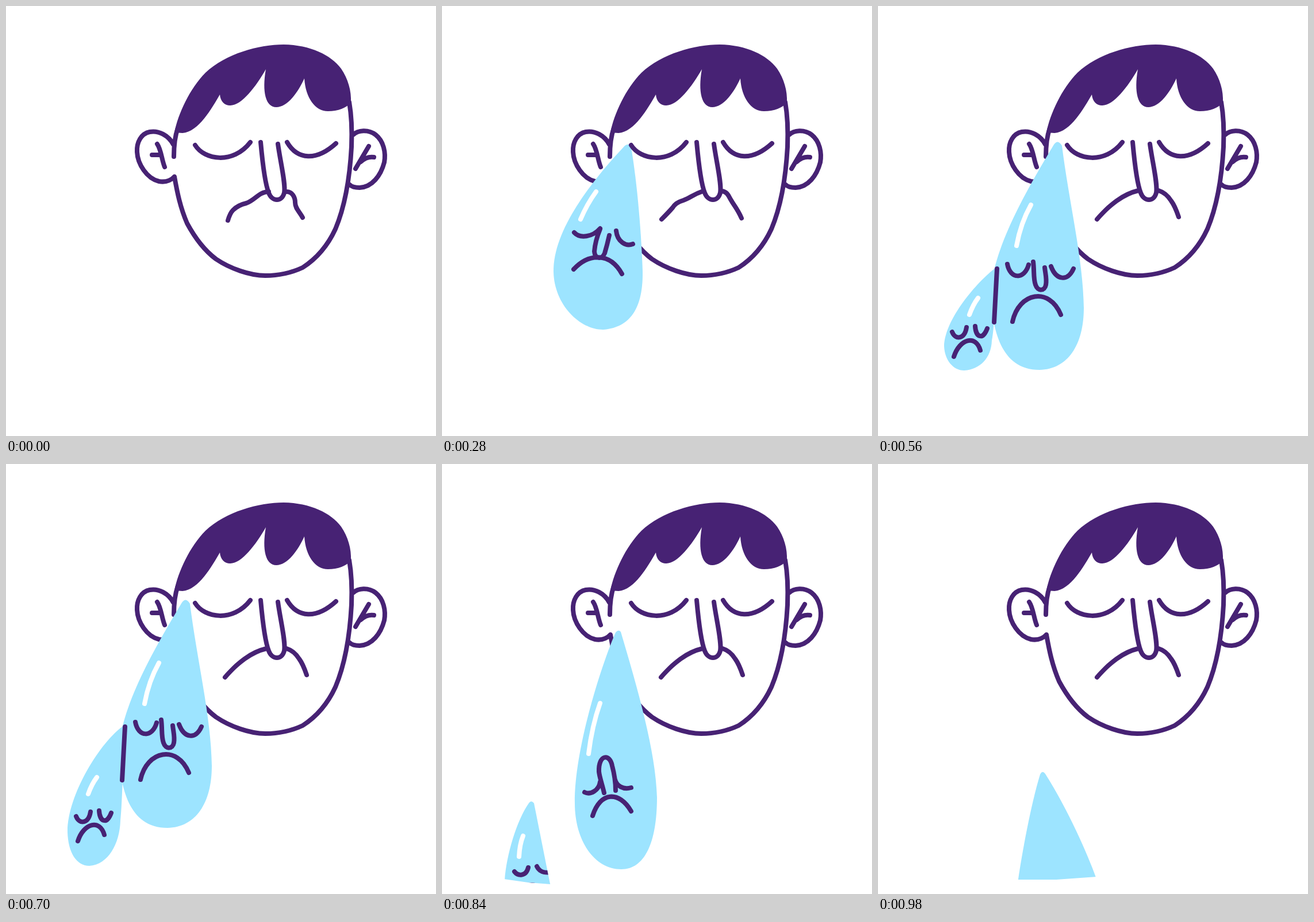
These frames come from a looping animation (748x748 px, 1050 ms). An HTML page with a canvas:

```html
<!DOCTYPE html>
<html>
<head>
<meta charset="utf-8">
<style>
  html, body { margin: 0; height: 100%; overflow: hidden; background: #fff; }
  canvas { display: block; }
</style>
</head>
<body>
<canvas id="stage" width="748" height="748"></canvas>
<script>
const ctx = document.getElementById('stage').getContext('2d');
const INK = '#472274', WATER = '#9de4ff';
const STEP = 70, STEPS = 15;

const hair = new Path2D(`M293 220 C299 188 320 143 347 116 C382 83 440 67 483 67 C530 68 565 85 583 109
  C595 127 601 147 600 168 C592 177 578 183 560 183 C538 183 521 160 519 126 C508 150 490 176 470 176
  C452 176 445 150 452 110 C435 140 410 173 390 173 C380 173 373 166 372 154 C358 178 335 219 307 221 Z`);

const outline = new Path2D(`M299 212 C294 226 292 240 292 262
  M293 297 C298 325 303 350 315 378 C328 402 345 425 365 440 C390 457 425 469 451 469
  C479 469 501 462 516 455 C541 439 560 416 573 388 C589 350 598 300 601 245 C602 220 601 190 597 167
  M291 241 C283 225 265 216 250 219 C235 222 227 237 228 254 C229 275 245 300 266 305 C277 307 286 304 293 297
  M604 224 C612 216 630 214 643 224 C657 235 661 255 658 272 C652 295 637 315 615 316 C607 316 601 314 598 311
  M263 240 C270 250 271 268 276 280 M254 259 L269 259
  M631 244 L608 283 M640 263 Q628 261 617 271`);

const features = new Path2D(`M329 242 C345 268 395 276 425 237 M489 237 C507 268 540 270 574 239
  M443 237 C446 270 451 310 457 325 C463 341 480 341 484 325 C487 310 477 270 473 240`);

// Nothing falls below this floor line
const floor = new Path2D('M0 0 H748 V718 H380 L310 723 L244 723 L189 731 L150 728 L108 722 H0 Z');

const movePairs = (path, fn) => path.replace(/(\d+) (\d+)/g, (_, x, y) => fn(+x, +y));
const shift = (path, dx, dy) => movePairs(path, (x, y) => `${x + dx} ${y + dy}`);
const collapse = (pose, at, point) =>
  ({ at, w: 0, ...Object.fromEntries(['body', 'face', 'shine'].map(k => [k, movePairs(pose[k], () => point)])) });

const mouth = [
  { at: 0, path: 'M457 323 C440 323 433 338 418 343 C405 346 399 351 395 355 C390 360 388 366 386 373 M487 323 C498 322 503 333 503 342 C503 352 510 357 516 368' },
  { at: 2, path: 'M452 320 C440 325 438 337 420 338 C408 339 402 341 401 349 C399 360 396 371 385 372 M488 322 C502 323 500 335 505 345 C510 355 520 355 521 370' },
  { at: 4, path: 'M454 322 C436 328 432 334 420 338 C408 342 405 345 401 351 C394 359 390 363 382 371 M487 322 C497 323 499 332 503 338 C508 347 514 353 521 369' },
  { at: 6, path: 'M453 321 C440 324 426 331 415 339 C407 345 400 351 396 355 C391 360 386 365 381 371 M488 321 C498 324 505 331 510 339 C516 347 520 358 523 367' }
];

const bigTear = [
  { at: 2, w: 7,
    body: 'M319 239 C296 258 268 300 267 331 C267 355 280 374 302 374 C325 373 334 345 334 318 C334 285 331 265 329 240 Q326 230 319 239 Z',
    face: 'M280 305 C282 316 296 316 300 308 M303 309 C305 320 317 320 321 315 M301 308 C301 308 301 308 301 308 C301 308 301 308 301 308 C301 308 301 308 301 308 M282 330 C288 318 304 316 315 333',
    shine: 'M304 267 Q293 276 287 292' },
  { at: 4, w: 8,
    body: 'M318 243 C260 305 193 390 194 462 C195 520 240 563 280 563 C320 560 350 535 349 462 C347 400 340 310 329 246 Q325 238 318 243 Z',
    face: 'M230 394 C240 405 262 402 275 387 M303 391 C305 410 320 419 332 414 M275 388 C270 400 266 415 265 427 C266 440 278 442 283 430 C286 420 289 408 291 399 M229 458 C255 430 292 428 313 466',
    shine: 'M268 323 Q252 345 241 371' },
  { at: 6, w: 8,
    body: 'M306 241 C262 315 196 425 196 507 C200 560 212 633 281 633 C330 632 358 590 358 525 C357 440 332 340 320 243 Q313 231 306 241 Z',
    face: 'M225 449 C230 476 255 476 262 450 M301 453 C310 477 330 480 340 457 M270 445 C272 460 270 475 274 485 C278 497 290 496 292 485 C294 475 291 465 290 455 M234 549 C245 498 298 488 318 537',
    shine: 'M266 346 Q248 378 241 417' },
  { at: 12, w: 8,
    body: 'M302 293 C275 355 230 500 231 590 C231 655 265 705 312 705 C352 705 374 660 374 580 C372 500 340 390 311 292 Q307 287 302 293 Z',
    face: 'M248 571 C258 576 273 568 275 553 M301 549 C304 560 315 567 329 563 M282 572 C278 555 274 545 273 535 C272 505 292 503 296 525 C300 540 302 555 302 568 M262 612 C275 570 308 568 329 604',
    shine: 'M275 416 Q261 455 255 504' }
];
bigTear.unshift(collapse(bigTear[0], 0, '324 238'));
bigTear.splice(4, 0, { ...bigTear[3], at: 10 });
bigTear.push({ at: 14, w: 8,
  body: 'M282 540 C266 592 250 680 244 722 C240 800 270 900 320 900 C370 900 400 800 379 719 C365 680 330 600 291 539 Q286 532 282 540 Z',
  face: shift(bigTear[5].face, 0, 246),
  shine: shift(bigTear[5].shine, 0, 320) });

const smallTear = [
  { at: 10, w: 8,
    body: 'M205 455 C165 482 107 575 107 640 C108 675 122 699 145 699 C178 697 198 660 199 620 C203 585 203 500 209 457 Q207 454 205 455 Z',
    face: 'M122 613 C128 628 144 625 147 605 M162 603 C163 622 175 628 183 607 M125 656 C135 625 163 617 171 645',
    shine: 'M158 545 Q149 557 143 574' },
  { at: 12, w: 8,
    body: 'M151 590 C130 620 112 680 109 724 C104 770 120 810 145 810 C175 810 200 790 188 730 C180 690 168 630 160 590 Q155 584 151 590 Z',
    face: 'M126 709 C132 717 146 718 150 702 M165 700 C170 710 178 712 190 710 M128 756 C138 730 165 722 175 748',
    shine: 'M141 647 Q135 662 134 683' }
];
smallTear.unshift({ at: 8, w: 8,
  body: 'M205 455 C172 480 116 545 115 592 C116 615 130 634 150 634 C178 632 197 612 198 582 C203 560 203 500 209 457 Q207 454 205 455 Z',
  face: shift(smallTear[0].face, 7, -46),
  shine: shift(smallTear[0].shine, 16, -37) });
smallTear.unshift(collapse(smallTear[0], 6, '205 455'));
const [body, face, shine] = ['body', 'face', 'shine'].map(k => shift(smallTear[3][k], 0, 250));
smallTear.push({ at: 14, w: 8, body, face, shine });

function mix(a, b, u) {
  const to = b.match(/\d+/g);
  let n = 0;
  return a.replace(/\d+/g, v => +v + (to[n++] - v) * u);
}

function poseAt(keys, i) {
  const k = keys.findLastIndex(p => p.at <= i);
  const a = keys[k], b = keys[k + 1];
  if (!b) return a;
  let u = (i - a.at) / (b.at - a.at);
  if (a.at >= 10) u **= 1.4; // falling speeds up
  const pose = {};
  for (const key in a) {
    pose[key] = typeof a[key] === 'string' ? mix(a[key], b[key], u) : a[key] + (b[key] - a[key]) * u;
  }
  return pose;
}

function line(path, width = 8, color = INK) {
  ctx.lineWidth = width;
  ctx.strokeStyle = color;
  ctx.stroke(path);
}

function fill(path, color) {
  ctx.fillStyle = color;
  ctx.fill(path);
}

function drawTear(keys, i) {
  if (i <= keys[0].at) return;
  const { body, face, shine, w } = poseAt(keys, i);
  const shape = new Path2D(body);
  ctx.save();
  ctx.clip(floor);
  fill(shape, WATER);
  ctx.clip(shape);
  line(new Path2D(shine), w, '#fff');
  line(new Path2D(face), w);
  ctx.restore();
}

function draw(now) {
  const i = Math.floor(now / STEP) % STEPS;
  ctx.clearRect(0, 0, 748, 748);
  ctx.lineCap = ctx.lineJoin = 'round';
  line(outline);
  fill(hair, INK);
  drawTear(smallTear, i);
  drawTear(bigTear, i);
  if (i > 6 && i < 11) {
    const end = Math.min(1, (i - 6) / 2);
    line(new Path2D(`M207 457 Q${207 - 2 * end} ${457 + 40 * end} ${207 - 5 * end} ${457 + 93 * end}`));
  }
  line(features);
  line(new Path2D(poseAt(mouth, i).path));
}

const start = performance.now();
function tick() {
  draw(performance.now() - start);
  requestAnimationFrame(tick);
}
tick();
</script>
</body>
</html>
```
